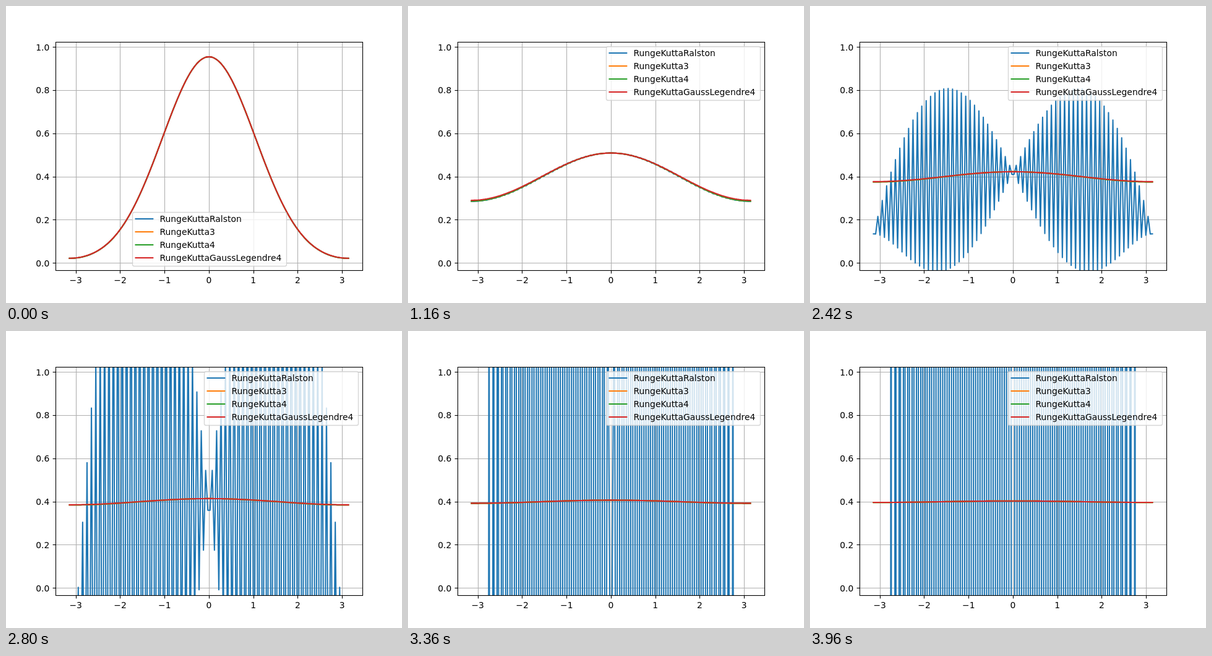
An HTML page with a canvas for the animation above (3.98 s loop, 640x480 px).

```html
<!DOCTYPE html>
<html lang="en">
<head>
<meta charset="utf-8">
<title>Heat equation solvers</title>
<style>
html, body { margin: 0; width: 100%; height: 100%; overflow: hidden; background: #fff; }
canvas { display: block; }
</style>
</head>
<body>
<canvas id="plot" width="640" height="480"></canvas>
<script>
const ctx = document.getElementById('plot').getContext('2d');
const STEP = 20, STEPS = 199;
const LEFT = 80, RIGHT = 576, TOP = 58, BOTTOM = 427;
const POINTS = 128, DX = 2 * Math.PI / (POINTS - 1);
const LINE = 2.08;
const SERIES = [
  ['RungeKuttaRalston', '#1f77b4'],
  ['RungeKutta3', '#ff7f0e'],
  ['RungeKutta4', '#2ca02c'],
  ['RungeKuttaGaussLegendre4', '#d62728']
];

const px = x => 328 + x * 71.76;
const py = u => 415.3 - u * 349;
const snap = v => Math.round(v - 0.05) + 0.5;

// Diffusing bell curve as a cosine series with reflecting ends
function heat(x, t) {
  let u = 0.3995;
  for (let k = 1; k <= 7; k++) {
    u += 0.7979 * Math.exp(-k * k * (0.5 + t)) * Math.cos(k * x);
  }
  return u;
}

// The explicit schemes sag slightly towards the ends
function explicit(x, t) {
  return heat(x, t) - 0.012 * t * Math.exp(-t) * Math.sin(x / 2) ** 2;
}

// Growing grid-scale oscillation, plus the boundary layer it drives
function unstable(x, t, i, amp) {
  const sign = i % 2 ? 1 : -1;
  const zigzag = sign * Math.sin(x);
  const layer = 0.57 * Math.cosh(x / 0.56) / Math.cosh(Math.PI / 0.56);
  return explicit(x, t) + amp * (zigzag - layer);
}

function segment(x1, y1, x2, y2, color, width) {
  ctx.strokeStyle = color;
  ctx.lineWidth = width;
  ctx.beginPath();
  ctx.moveTo(x1, y1);
  ctx.lineTo(x2, y2);
  ctx.stroke();
}

function label(text, x, y, align) {
  ctx.fillStyle = '#000';
  ctx.textAlign = align;
  ctx.fillText(text, x, y);
}

function curve(color, f) {
  ctx.strokeStyle = color;
  ctx.lineWidth = LINE;
  ctx.beginPath();
  for (let i = 0; i < POINTS; i++) {
    const x = -Math.PI + i * DX;
    ctx.lineTo(px(x), py(f(x, i)));
  }
  ctx.stroke();
}

function grid() {
  ctx.lineCap = 'butt';
  for (let x = -3; x <= 3; x++) {
    const gx = snap(px(x));
    segment(gx, TOP, gx, BOTTOM, '#b0b0b0', 1.1);
    segment(gx, BOTTOM + 0.5, gx, BOTTOM + 5.4, '#000', 1.1);
    label(String(x).replace('-', '\u2212'), px(x), 448, 'center');
  }
  for (let k = 0; k <= 5; k++) {
    const gy = snap(py(k / 5));
    segment(LEFT, gy, RIGHT, gy, '#b0b0b0', 1.1);
    segment(LEFT + 0.5, gy, LEFT - 4.4, gy, '#000', 1.1);
    label((k / 5).toFixed(1), 70.3, Math.round(py(k / 5) + 5.2), 'right');
  }
}

function legend(x, y) {
  ctx.beginPath();
  ctx.roundRect(x + 0.5, y + 0.5, 249, 87, 2.8);
  ctx.fillStyle = 'rgba(255,255,255,0.8)';
  ctx.fill();
  ctx.strokeStyle = 'rgba(204,204,204,0.8)';
  ctx.lineWidth = 1.39;
  ctx.stroke();
  SERIES.forEach(([name, color], i) => {
    const row = y + 11 + i * 21;
    segment(x + 5.5, row, x + 33.3, row, color, LINE);
    label(name, x + 44.5, row + 5, 'left');
  });
}

function draw(n) {
  const t = 0.049 + 0.0248 * n;
  const amp = 0.421 * Math.exp(0.0785 * (n - 121));
  ctx.fillStyle = '#fff';
  ctx.fillRect(0, 0, 640, 480);
  ctx.font = '13.89px "DejaVu Sans", sans-serif';
  ctx.textBaseline = 'alphabetic';
  ctx.lineJoin = 'round';
  grid();

  ctx.save();
  ctx.beginPath();
  ctx.rect(LEFT, TOP, RIGHT - LEFT, BOTTOM - TOP);
  ctx.clip();
  ctx.lineCap = 'square';
  curve(SERIES[0][1], (x, i) => unstable(x, t, x < 0 ? i : i, x < 0 ? amp : amp));
  curve(SERIES[1][1], x => explicit(x, t));
  curve(SERIES[2][1], x => explicit(x, t));
  curve(SERIES[3][1], x => heat(x, t));
  ctx.restore();

  ctx.strokeStyle = '#000';
  ctx.lineWidth = 1.1;
  ctx.lineJoin = 'miter';
  ctx.strokeRect(LEFT + 0.5, TOP + 0.5, RIGHT - LEFT, BOTTOM - TOP);

  // The legend moves up once the peak has dropped below its box
  ctx.lineCap = 'square';
  if (n < 14) legend(204, 333);
  else legend(320, 65);
}

const start = performance.now();
function tick() {
  const elapsed = Math.max(0, performance.now() - start);
  draw(Math.floor(elapsed / STEP) % STEPS);
  requestAnimationFrame(tick);
}
tick();
</script>
</body>
</html>
```
